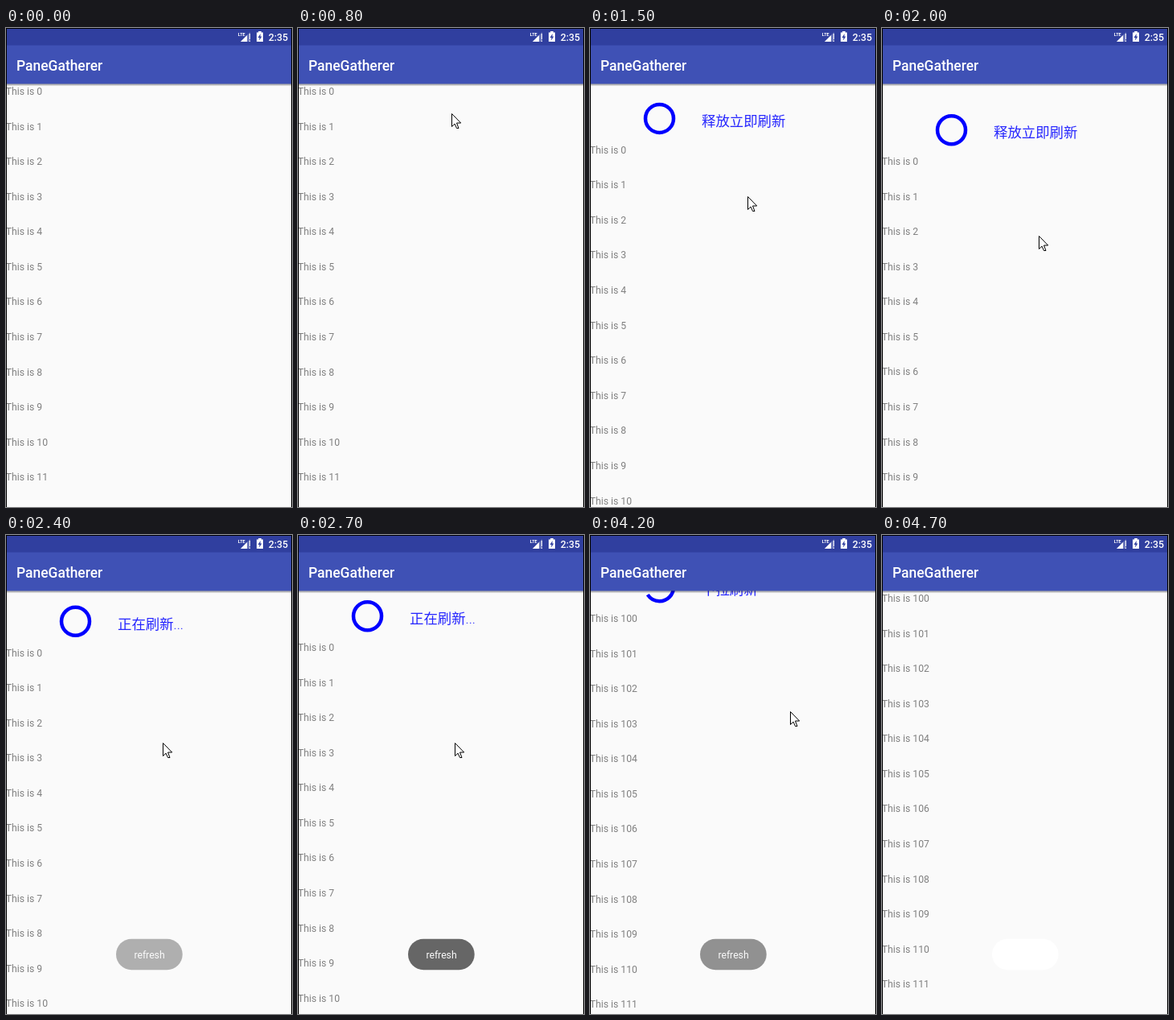
Animation of 356 by 595 pixels, one loop 5.1 s. Source, as an HTML page with a canvas:

```html
<!DOCTYPE html>
<html lang="en">
<head>
<meta charset="utf-8">
<title>Pull to refresh</title>
<style>
  html, body { margin: 0; width: 100%; height: 100%; overflow: hidden; background: #fafafa; }
  canvas { display: block; width: 356px; height: 595px; }
</style>
</head>
<body>
<canvas id="stage" width="356" height="595"></canvas>
<script>
const ctx = document.getElementById('stage').getContext('2d');
const W = 356, H = 595, LOOP = 5100, TICK = 100;
const STATUS_BOTTOM = 21.5, BAR_BOTTOM = 69.5, ROW = 43.58;
const HEADER = 61, MAX_PULL = 87, SLOP = 3;
const GRAB = 800, RELEASE = 2150, LOADED = 4020, FADE_OUT = 4050, SETTLE = 500;
const SANS = 'Roboto, "Noto Sans CJK SC", "Noto Sans CJK", sans-serif';

const linear = u => u;
const decelerate = u => 1 - (1 - u) ** 2;
const progress = (t, start, length = SETTLE) => Math.min(1, Math.max(0, (t - start) / length));
const mix = (a, b, u) => a + (b - a) * u;

// The pointer comes in, drags down, drifts while loading and leaves to the right
function pointerAt(t) {
  let x = 321, y = 59;
  const glide = (toX, toY, start, length, ease = linear) => {
    const u = ease(progress(t, start, length));
    x = mix(x, toX, u);
    y = mix(y, toY, u);
  };
  glide(191, 106, 100, GRAB - 100, decelerate);
  glide(196, 159, GRAB, 400);
  glide(195, 258, 1200, 600);
  glide(198, 244, 3500, 200, decelerate);
  glide(350, 170, 4000, 600);
  return { x: Math.round(x), y: Math.round(y), visible: t >= 100 && t <= 4600 };
}

function pullAt(t) {
  if (t < RELEASE) {
    const drag = Math.max(0, pointerAt(t).y - pointerAt(GRAB).y - SLOP);
    // Beyond the header height the drag is damped
    return t < GRAB ? 0 : Math.min(drag, HEADER + (drag - HEADER) * 0.3, MAX_PULL) * (drag > HEADER)
      + drag * (drag <= HEADER);
  }
  return t < LOADED
    ? mix(MAX_PULL, HEADER, decelerate(progress(t, RELEASE)))
    : mix(HEADER, 0, decelerate(progress(t, LOADED)));
}

function rect(x, y, w, h, color) {
  ctx.fillStyle = color;
  ctx.fillRect(x, y, w, h);
}

function text(str, x, y, size, color, weight = 400, align = 'left') {
  ctx.font = `${weight} ${size}px ${SANS}`;
  ctx.textAlign = align;
  ctx.fillStyle = color;
  ctx.fillText(str, x, y);
}

function shape(path, color) {
  ctx.fillStyle = color;
  ctx.fill(new Path2D(path));
}

function drawHeader(t, pull) {
  if (pull < 0.5) return;
  const y = 39.7 + pull;
  const refreshing = t >= RELEASE && t < LOADED;
  const label = refreshing ? '正在刷新...' : pull >= HEADER ? '释放立即刷新' : '下拉刷新';
  ctx.beginPath();
  ctx.arc(86.5, y, 17.5, 0, Math.PI * 2 * Math.min(1, pull / HEADER));
  ctx.lineWidth = 4.5;
  ctx.strokeStyle = '#00f';
  ctx.stroke();
  text(label, 139, y + 9.7, 17.4, 'rgba(0,0,255,.85)', 300);
}

function drawList(t, pull) {
  const first = t < LOADED ? 0 : 100;
  for (let i = 0; i < 12; i++) {
    text('This is ' + (first + i), -0.2, 83 + pull + i * ROW, 12.2, '#808080');
  }
}

function drawBars() {
  rect(0, 0, W, STATUS_BOTTOM + 0.5, '#303f9f');
  rect(0, STATUS_BOTTOM, W, BAR_BOTTOM - STATUS_BOTTOM, '#3f51b5');
  const shade = ctx.createLinearGradient(0, BAR_BOTTOM, 0, BAR_BOTTOM + 3);
  shade.addColorStop(0, 'rgba(0,0,0,.4)');
  shade.addColorStop(1, 'rgba(0,0,0,0)');
  rect(0, BAR_BOTTOM, W, 3, shade);
  text('PaneGatherer', 13, 52.5, 17.45, '#fff', 500);
}

function drawStatusIcons() {
  shape('M304 5V17H292Z', 'rgba(255,255,255,.3)');
  shape('M300 9V17H292Z', '#fff');
  text('LTE', 288.7, 10, 5.5, '#fff', 700);
  rect(303, 7, 1, 7, '#fff');
  rect(303, 15.5, 1, 1.5, '#fff');
  rect(312, 5.5, 8, 11.5, '#fff');
  rect(314.2, 4, 3.6, 2, '#fff');
  shape('M316.8 7L313.6 12H315.5L315.2 15.5L318.4 10.5H316.5Z', '#303f9f');
  text('2:35', 351, 16, 12.3, '#fff', 500, 'right');
}

function pill(color, alpha = 1) {
  ctx.globalAlpha = alpha;
  ctx.fillStyle = color;
  ctx.beginPath();
  ctx.roundRect(137, 501.7, 82.7, 38.5, 19.2);
  ctx.fill();
  ctx.globalAlpha = 1;
}

function drawToast(t) {
  const alpha = progress(t, RELEASE) - progress(t, FADE_OUT);
  if (alpha > 0) {
    pill('#666', alpha);
    text('refresh', 178.5, 526, 12.2, '#fbfbfb', 400, 'center');
  } else if (t > FADE_OUT) {
    pill('#fff');
  }
}

function drawPointer(t) {
  const { x, y, visible } = pointerAt(t);
  if (!visible) return;
  const arrow = new Path2D('M0 0V16L3.6 12.6L6 18H8.5L6 11.5H11.2Z');
  ctx.save();
  ctx.translate(x + 0.5, y + 0.5);
  ctx.fillStyle = '#fff';
  ctx.fill(arrow);
  ctx.lineWidth = 1;
  ctx.strokeStyle = '#000';
  ctx.stroke(arrow);
  ctx.restore();
}

function draw(t) {
  const pull = pullAt(t);
  rect(0, 0, W, H, '#fafafa');
  drawHeader(t, pull);
  drawList(t, pull);
  drawBars();
  drawStatusIcons();
  ctx.lineWidth = 1;
  ctx.strokeStyle = '#000';
  ctx.strokeRect(0.5, 0.5, W - 1, H + 1);
  drawToast(t);
  drawPointer(t);
}

const start = performance.now();
function frame() {
  const t = (performance.now() - start) % LOOP;
  draw(Math.floor(t / TICK) * TICK);
  requestAnimationFrame(frame);
}
frame();
</script>
</body>
</html>
```
